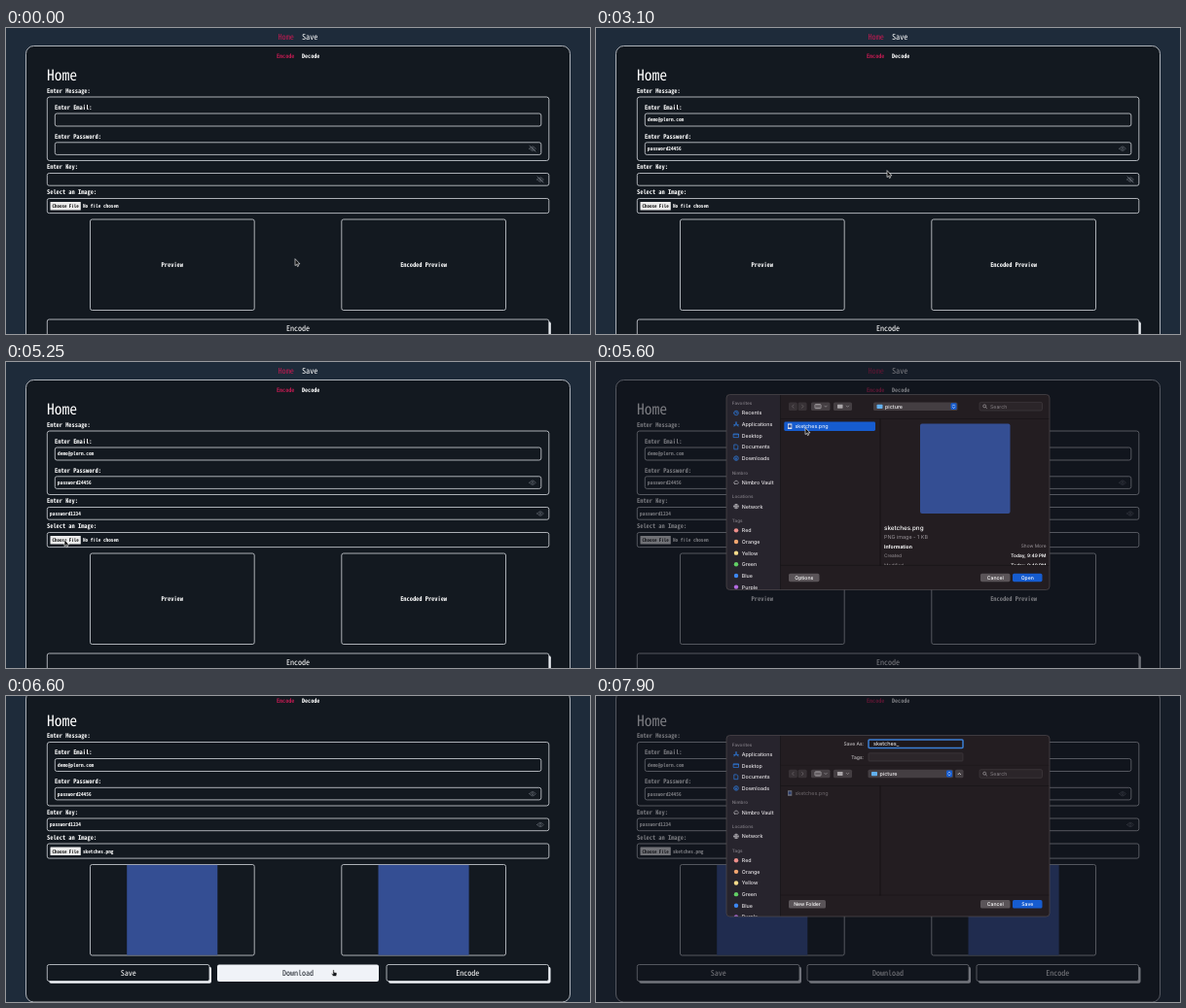
Animation of 600 by 315 pixels, one loop 8000 ms. Source, as an HTML page:

```html
<!DOCTYPE html>
<html lang="en">
<head>
<meta charset="utf-8">
<title>Message encoder</title>
<style>
  html, body { margin: 0; width: 100%; height: 100%; overflow: hidden; background: #1e2b3a; }
  svg { display: block; width: 600px; height: 315px; text-rendering: geometricPrecision; }
  text { white-space: pre; font-family: Inter, Roboto, sans-serif; }
  .m { font-family: "Noto Sans Mono CJK JP", "Noto Sans Mono CJK SC", "Noto Sans Mono", monospace; }
</style>
</head>
<body>
<svg id="stage" viewBox="0 0 600 315"></svg>
<script>
const LOOP = 8000, STEP = 50, SCROLL = 23.5;
const CARD = '#131920', LINE = '#d3d7dc', RED = '#bd1b50', BLUE = '#165ccf', PIC = '#344e93';
const EMAIL = 'demo@plorn.com', PASS = 'password24456', KEY = 'password1234', FILE = 'sketches.png';
const stage = document.getElementById('stage');

const clamp = v => Math.max(0, Math.min(1, v));
const ease = v => v * v * (3 - 2 * v);
const ramp = (t, a, b) => ease(clamp((t - a) / (b - a)));
const within = (t, a, b) => t >= a && t < b;
const typed = (s, t, from, gap) => s.slice(0, Math.max(0, Math.floor((t - from) / gap) + 1));

// y is the middle of the capitals
const text = (s, x, y, size, fill = '#fff', extra = '') =>
  `<text x="${x}" y="${y + size * .365}" font-size="${size}" fill="${fill}" ${extra}>${s}</text>`;
const mono = (s, x, y, size, fill = '#fff', extra = '') =>
  text(s, x, y, size, fill, `class="m" ${extra}`);
const BOLD = 'font-weight="700"', MID = 'text-anchor="middle"', END = 'text-anchor="end"';
const box = (x, y, x2, y2, r, fill, stroke = 'none', w = .8) =>
  `<rect x="${x}" y="${y}" width="${x2 - x}" height="${y2 - y}" rx="${r}" fill="${fill}" stroke="${stroke}" stroke-width="${w}"/>`;
const path = (d, stroke, w = .7, fill = 'none') =>
  `<path d="${d}" stroke="${stroke}" stroke-width="${w}" fill="${fill}" stroke-linecap="round" stroke-linejoin="round"/>`;
const at = (x, y, s) => `<g transform="translate(${x} ${y})">${s}</g>`;

function eye(x, y, open) {
  return at(x, y, path('M-3.3 0Q0-4.6 3.3 0Q0 4.6-3.3 0Z', '#626870', .7) +
    `<circle r="1.1" fill="none" stroke="#626870" stroke-width=".7"/>` +
    (open ? '' : path('M-3-2.8L3 2.8', '#7a8088', .8)));
}

function field(x, y, x2, y2, value, focus, t) {
  const mid = (y + y2) / 2;
  let s = box(x, y, x2, y2, 2, CARD, focus ? '#5c9df5' : LINE, focus ? 1.4 : .8);
  s += mono(value, x + 2.8, mid, 5.3, '#fff', BOLD);
  if (focus && t % 900 < 450) {
    const cx = x + 3.2 + value.length * 2.65;
    s += path(`M${cx} ${mid - 2.4}V${mid + 2.4}`, '#fff', .5);
  }
  return s;
}

function button(label, x, x2, hover) {
  const y = 300, y2 = 317;
  return (hover ? box(x, y, x2, y2 + .5, 2, '#f0f3f8')
    : box(x + 2, y + 2.2, x2 + 2, y2 + 2.2, 2, '#f0f3f8') + box(x, y, x2, y2, 2, CARD, LINE)) +
    mono(label, (x + x2) / 2, 309, 8, hover ? '#20262e' : '#fff', MID);
}

function preview(label, x, filled) {
  return box(x, 197, x + 168.7, 290.5, 2, CARD, LINE) +
    (filled ? box(x + 37.7, 197.4, x + 130.8, 290.2, 0, PIC)
      : mono(label, x + 84.3, 243.8, 6.4, '#fff', `${MID} ${BOLD}`));
}

function page(t) {
  const label = (s, x, y) => mono(s, x, y, 6.4, '#fff', BOLD);
  const secret = t < 2650 ? typed(PASS, t, 1450, 50).replace(/./g, '•') : PASS;
  const key = t < 4500 ? typed('password', t, 4000, 50) : typed(KEY, t, 4150, 50);
  const done = t >= 6400;
  return mono('Home', 279.5, 9, 8.2, RED) + mono('Save', 304, 9, 8.2) +
    box(20.5, 18.5, 579.5, 338.5, 8, CARD, LINE) +
    mono('Encode', 278, 28.5, 6.1, RED, BOLD) + mono('Decode', 304, 28.5, 6.1, '#fff', BOLD) +
    mono('Home', 42, 48.8, 15.5) +
    label('Enter Message:', 42, 64.6) +
    box(42.3, 71, 557.8, 136.5, 2.5, 'none', LINE) +
    label('Enter Email:', 50, 81.6) +
    field(50.3, 88, 549.8, 101, typed(EMAIL, t, 560, 38), within(t, 500, 1300), t) +
    label('Enter Password:', 50, 111.2) +
    field(50.3, 117.8, 549.8, 130.4, secret, within(t, 1300, 2850), t) +
    eye(541, 124.2, t >= 2650) +
    label('Enter Key:', 42, 142.8) +
    field(42.3, 149.5, 557.8, 162.2, key, within(t, 3800, 5100), t) +
    eye(549, 156, t >= 3400) +
    label('Select an Image:', 42, 168.7) +
    box(42.3, 175.5, 557.8, 190.6, 2, CARD, LINE) +
    box(45.5, 179, 76.8, 187.4, .5, '#ececec') +
    mono('Choose File', 47.6, 183.2, 4.95, '#111', BOLD) +
    mono(t < 5900 ? 'No file chosen' : FILE, 79, 183.4, 5.25, '#fff', BOLD) +
    preview('Preview', 86.5, t >= 5900) + preview('Encoded Preview', 344.8, done) +
    (done ? button('Save', 42.3, 209) + button('Download', 217, 383, within(t, 6450, 6950)) + button('Encode', 391, 557.5)
      : button('Encode', 42.3, 557.8, within(t, 6100, 6400)));
}

const ICONS = {
  Recents: 'M-2.3 0A2.3 2.3 0 1 0 2.3 0A2.3 2.3 0 1 0-2.3 0M0-1.3V0H1.2',
  Applications: 'M-2 2L.4-2.3M2 2L-.4-2.3M-2.5.7H2.5',
  Desktop: 'M-2.5-1.8H2.5V1.8H-2.5ZM-2.5-1H2.5',
  Documents: 'M-1.8-2.4H.6L1.8-1.2V2.4H-1.8Z',
  Downloads: 'M-2.3 0A2.3 2.3 0 1 0 2.3 0A2.3 2.3 0 1 0-2.3 0M0-1.2V1.2M-.9.4L0 1.2L.9.4',
  'Nimbro Vault': 'M-1.6 1.5H1.6A1.2 1.2 0 0 0 1.6-.7A1.7 1.7 0 0 0-1.5-.6A1.1 1.1 0 0 0-1.6 1.5Z',
  Network: 'M-2.3 0A2.3 2.3 0 1 0 2.3 0A2.3 2.3 0 1 0-2.3 0M-2.3 0H2.3M0-2.3Q-2 0 0 2.3Q2 0 0-2.3'
};
const TAGS = { Red: '#ee8f8b', Orange: '#f2a670', Yellow: '#f6dc8b', Green: '#62cf65', Blue: '#3d87f2', Purple: '#b46be0' };

function sidebar(top, recents) {
  const files = ['Applications', 'Desktop', 'Documents', 'Downloads'];
  const groups = {
    Favorites: recents ? ['Recents', ...files] : files,
    Nimbro: ['Nimbro Vault'], Locations: ['Network'], Tags: Object.keys(TAGS)
  };
  let y = top, s = '';
  for (const [head, items] of Object.entries(groups)) {
    s += text(head, 139.8, y, 4.6, '#77737b', 'font-weight="600"');
    y += 10;
    for (const name of items) {
      const tint = name === 'Network' || name === 'Nimbro Vault' ? '#b5b2b8' : '#2f7fe6';
      s += at(144, y, TAGS[name] ? `<circle r="2.2" fill="${TAGS[name]}"/>` : path(ICONS[name], tint));
      s += text(name, 149.8, y, 5.3, '#e6e3e6', 'font-weight="500"');
      y += 11.65;
    }
    y += 3.1;
  }
  return s;
}

function toolbar(y, x, x2) {
  const GREY = '#443e42', b = (a, c, fill = GREY) => box(a, y - 4.3, c, y + 4.3, 1.6, fill);
  const chevron = cx => path(`M${cx - 1.2} ${y - .6}L${cx} ${y + .6}L${cx + 1.2} ${y - .6}`, '#aaa6a9', .6);
  return b(198, 206.8, '#383236') + b(207.6, 216.6, '#383236') +
    path(`M203 ${y - 1.6}L201.6 ${y}L203 ${y + 1.6}M211.6 ${y - 1.6}L213 ${y}L211.6 ${y + 1.6}`, '#6d676b') +
    b(221, 240.5) + box(225, y - 2, 231, y + 2, .4, 'none', '#c3bfc2', .7) +
    path(`M227 ${y - 2}V${y + 2}M229 ${y - 2}V${y + 2}`, '#c3bfc2', .5) + chevron(236) +
    b(244, 263) + box(248, y - 2, 253.5, y + 2, .4, '#a9a5a8') + chevron(258.5) +
    b(x, x2) + box(x + 3.5, y - 2, x + 9.5, y + 2.3, .8, '#62b0ef') +
    text('picture', x + 12, y, 5.4, '#f0eef0', 'font-weight="500"') +
    box(x2 - 7, y - 3.4, x2 - 1, y + 3.4, 1.3, BLUE) +
    path(`M${x2 - 5} ${y - .8}l1-1l1 1M${x2 - 5} ${y + .8}l1 1l1-1`, '#fff', .6) +
    box(394, y - 4.3, 458.5, y + 4.3, 1.6, '#2b2529', '#4a4448', .5) +
    `<circle cx="399.2" cy="${y - .3}" r="1.5" fill="none" stroke="#b5b1b4" stroke-width=".6"/>` +
    path(`M400.4 ${y + .9}L401.6 ${y + 2}`, '#b5b1b4', .6) + text('Search', 405, y, 5.2, '#868085');
}

const push = (label, x, x2, y, fill = '#5a5458') =>
  box(x, y - 4.2, x2, y + 4.2, 1.6, fill) + text(label, (x + x2) / 2, y, 5.1, '#fff', `${MID} font-weight="500"`);

function panel(top, bottom, show, body) {
  if (show <= 0) return '';
  const k = .94 + .06 * show, cy = (top + bottom) / 2;
  return `<g opacity="${show}" transform="translate(300 ${cy}) scale(${k}) translate(-300 ${-cy})">
    <clipPath id="frame">${box(134, top, 466, bottom, 3.5, '#000')}</clipPath>
    <g clip-path="url(#frame)">${box(134, top, 466, bottom, 0, '#231d21')}${box(134, top, 189.5, bottom, 0, '#27242d')}
    ${path(`M189.5 ${top}V${bottom}`, '#151215', .6)}${body}</g>
    ${box(134, top, 466, bottom, 3.5, 'none', '#514b50', .7)}</g>`;
}

function openPanel(t, show) {
  const picked = t >= 5550, GREY = '#9b959a';
  const row = (s, y) => text(s, 296, y, 4.8, GREY) + text('Today, 9:49 PM', 462.5, y, 4.8, '#fff', `${END} font-weight="600"`);
  return panel(33.5, 234.5, show, sidebar(42.5, true) + toolbar(45.7, 285, 371.5) +
    path('M190 58.5H466M190 209.3H466', '#151215', .6) + path('M292 59V209', '#121012', .8) +
    (picked ? box(193.3, 61.5, 287, 71, 1.4, BLUE) : '') +
    box(197, 63.5, 201.3, 69, .3, '#dfe5f2') + box(197.7, 64.6, 200.6, 67.5, 0, PIC) +
    text(FILE, 204.5, 66.2, 5.4) +
    (picked ? box(333, 63.5, 425.5, 156, 2, PIC) +
      text(FILE, 296, 171, 6.3, '#fff', 'font-weight="500"') +
      text('PNG image - 1 KB', 296, 180, 5.4, GREY) +
      text('Information', 296, 189.7, 5.1, '#fff', BOLD) + text('Show More', 462.5, 189.7, 4.8, GREY, END) +
      `<clipPath id="info">${box(292, 60, 466, 209, 0, '#000')}</clipPath><g clip-path="url(#info)">` +
      row('Created', 199.2) + row('Modified', 208.8) + '</g>' : '') +
    push('Options', 198, 229.5, 222) + push('Cancel', 395, 425.5, 222) +
    push('Open', 428, 458.5, 222, picked ? BLUE : '#3a3438'));
}

function savePanel(t, show) {
  const fresh = t < 7400;
  return panel(40.5, 227, show, sidebar(50, false) +
    text('Save As:', 275, 49.2, 5, '#d9d6d8', END) +
    box(280, 45, 377, 53.6, 1, '#1d181b', '#3b7fd4', 1.5) +
    (fresh ? box(284.5, 46, 304, 52.6, 0, '#335f9c') : '') +
    text(fresh ? 'image' : typed('sketches_', t, 7400, 60), 285, 49.2, 5.6) +
    text('Tags:', 275, 63, 5, '#d9d6d8', END) + box(280, 58.8, 377, 67, .8, '#2c262a', '#4a4448', .5) +
    path('M190 71.3H466', '#1a1619', .5) + toolbar(80, 279.5, 367) +
    box(369, 75.7, 377.5, 84.3, 1.6, '#443e42') + path('M372 80.7L373.3 79.4L374.6 80.7', '#fff') +
    path('M190 92.5H466M190 205H466', '#151215', .6) + path('M292 93V205', '#121012', .8) +
    box(197, 97.3, 201.3, 102.8, .3, '#6d717c') + box(197.7, 98.4, 200.6, 101.3, 0, '#2c3d6b') +
    text(FILE, 204.5, 100, 5.4, '#6d676b') +
    push('New Folder', 198, 236, 214.3) + push('Cancel', 395, 425.5, 214.3) + push('Save', 428, 458.5, 214.3, BLUE));
}

// time, x, y, pointer: a arrow, i text, h hand, - hidden
const MOVES = [
  [50, 297, 238, 'a'], [450, 96, 95, 'i'], [550, 96, 95, '-'], [1100, 96, 95, 'i'], [1250, 97, 119, 'i'],
  [1350, 97, 119, 'i'], [1450, 112, 160, 'a'], [1500, 112, 160, '-'], [2200, 112, 160, 'a'],
  [2550, 541, 123, 'h'], [2650, 541, 123, 'a'], [2800, 570, 172, 'a'], [2900, 570, 172, 'a'],
  [3100, 299, 147, 'a'], [3350, 549, 155, 'h'], [3450, 549, 155, 'a'], [3550, 572, 172, 'a'],
  [3800, 300, 156, 'i'], [3950, 300, 156, '-'], [4700, 300, 156, 'a'], [5050, 60, 183, 'a'],
  [5250, 60, 183, 'a'], [5500, 215, 68, 'a'], [5620, 215, 68, 'a'], [5800, 443, 222, 'a'],
  [5900, 443, 222, 'a'], [6100, 300, 307, 'h'], [6400, 300, 287, 'h'], [6550, 337, 285, 'h'], [7050, 337, 285, '-']
];
const CLICKS = [500, 1300, 2600, 2850, 3400, 3800, 5100, 5550, 5850, 6350, 6850];
const POINTERS = {
  a: path('M0 0V6.6L1.5 5.3L2.5 7.6L3.6 7.1L2.6 4.9H4.6Z', '#fff', .6, '#111'),
  i: path('M-1.4-3.4Q0-3.4 0-2.4V2.4Q0 3.4-1.4 3.4M1.4-3.4Q0-3.4 0-2.4M0 2.4Q0 3.4 1.4 3.4', '#e8e8e8', .8),
  h: path('M-1.2.8V-2.8Q-.5-3.8.2-2.8V-.8L2.4-.2Q3.2.1 3 1.2L2.4 3.6H-1L-2.8 1Q-2.6 0-1.2.8Z', '#fff', .6, '#15181d')
};

function pointer(t) {
  const n = Math.max(0, MOVES.findLastIndex(m => m[0] <= t));
  const a = MOVES[n], b = MOVES[n + 1] || a;
  if (a[3] === '-') return '';
  const k = a === b ? 0 : ramp(t, a[0], b[0]);
  const ring = CLICKS.some(c => within(t, c - 50, c + 50)) ?
    '<circle r="6.6" fill="#1b2027" fill-opacity=".8" stroke="#8d9299" stroke-width="1"/>' : '';
  return at(a[1] + (b[1] - a[1]) * k, a[2] + (b[2] - a[2]) * k, ring + POINTERS[a[3]]);
}

function draw(t) {
  const opened = ramp(t, 5250, 5400) * (1 - ramp(t, 5880, 5980));
  const saving = ramp(t, 6950, 7100);
  const dim = Math.max(opened, saving) * .56;
  stage.innerHTML = box(0, 0, 600, 315, 0, '#1e2b3a') +
    at(0, -SCROLL * ramp(t, 6050, 6250), page(t)) +
    (dim ? `<rect width="600" height="315" fill="#11131b" opacity="${dim}"/>` : '') +
    openPanel(t, opened) + savePanel(t, ramp(t, 7000, 7200)) + pointer(t);
}

let last = -1;
function tick() {
  const t = Math.floor(performance.now() % LOOP / STEP) * STEP;
  if (t !== last) draw(last = t);
  requestAnimationFrame(tick);
}
tick();
</script>
</body>
</html>
```
